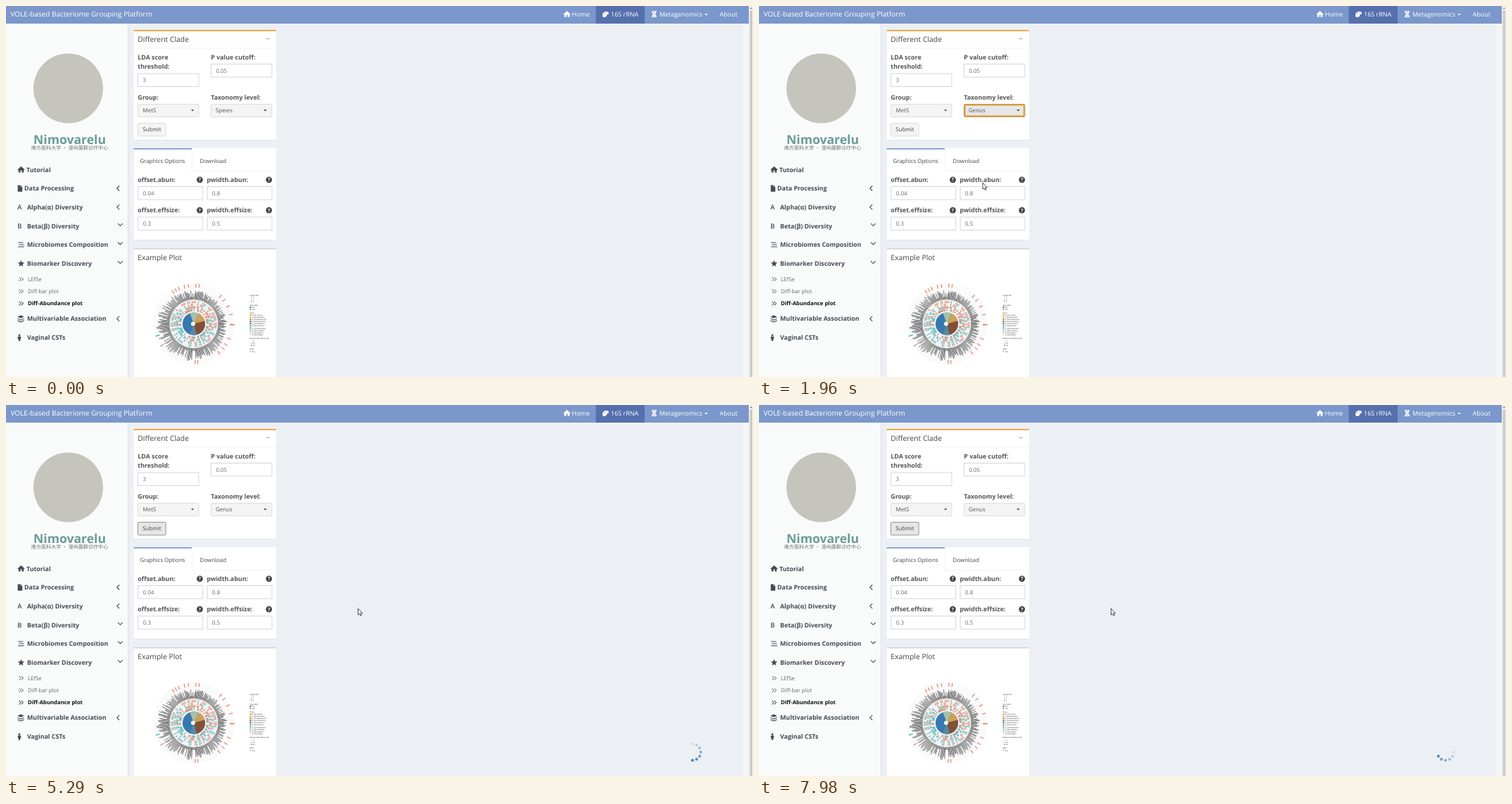
These frames come from a looping animation (1062 px wide and 527 px high, 8 s). An HTML page:

```html
<!DOCTYPE html>
<html lang="en">
<head>
<meta charset="utf-8">
<title>Bacteriome platform</title>
<style>
html, body { margin: 0; width: 100%; height: 100%; overflow: hidden; background: #ecf0f5; }
svg { display: block; width: 1062px; height: 527px; font-family: "Open Sans", "Noto Sans", sans-serif; text-rendering: geometricPrecision; }
</style>
</head>
<body>
<svg id="stage" viewBox="0 0 1062 527" xmlns="http://www.w3.org/2000/svg"></svg>
<script>
const LOOP = 8000;
const LEVELS = ['Kingdom', 'Phylum', 'Class', 'Order', 'Family', 'Genus', 'Speies'];
const ROW_TOP = 162.2, ROW_H = 16.8;

// Drawing helpers
const rect = (x, y, w, h, fill, extra = '') => `<rect x="${x}" y="${y}" width="${w}" height="${h}" fill="${fill}" ${extra}/>`;
const text = (x, y, s, size, fill, extra = '') => `<text x="${x}" y="${y}" font-size="${size}" fill="${fill}" ${extra}>${s}</text>`;
const bold = (x, y, s, fill = '#555', size = 8.87) => text(x, y, s, size, fill, 'font-weight="700"');
const circle = (x, y, r, fill, extra = '') => `<circle cx="${x}" cy="${y}" r="${r}" fill="${fill}" ${extra}/>`;
const path = (d, fill, extra = '') => `<path d="${d}" fill="${fill}" ${extra}/>`;
const stroke = (d, color, width) => path(d, 'none', `stroke="${color}" stroke-width="${width}"`);
const at = (x, y, body) => `<g transform="translate(${x} ${y})">${body}</g>`;
const caret = (x, y, fill) => path(`M${x - 2.2} ${y - 1.1}h4.4l-2.2 2.4z`, fill);
const home = (x, y, fill) => at(x, y, path('M0-4.6L5.2.2 4.5 1 3.7.3V4.3H1V1.2H-1V4.3H-3.7V.3L-4.5 1-5.2.2z', fill));

function random(seed) {
  return () => (seed = (seed * 16807) % 2147483647) / 2147483647;
}

function field(x, y, w, value) {
  return rect(x, y, w, 18.5, '#fff', 'stroke="#d2d6de"') + text(x + 7, y + 12.3, value, 7.9, '#666');
}

function navbar() {
  const blue = '#7b97cb', white = '#fff';
  return rect(0, 0, 1056, 25, blue) + rect(838.5, 0, 69.5, 25, '#5670ad')
    + text(6.5, 15.2, 'VOLE-based Bacteriome Grouping Platform', 10, white)
    + home(797.5, 11.5, white) + text(804.5, 14.6, 'Home', 9, white)
    + path('M848 13q0-4 4-5 4-1 5 2 0 2-2 2-1 0-1 2-1 2-4 2-2 0-2-3z', white)
    + circle(851, 11, .7, '#5670ad') + circle(854, 9.6, .7, '#5670ad')
    + text(860, 14.6, '16S rRNA', 9, white)
    + stroke('M918 7.5h7M918 15.5h7M919 8q0 2.5 2.5 3.5t2.5 3.5M924 8q0 2.5-2.5 3.5t-2.5 3.5M919.5 9.4h4M919.5 13.7h4', white, 1.2)
    + text(929, 14.6, 'Metagenomics', 8.95, white) + caret(995.5, 12.2, white)
    + text(1014.5, 14.6, 'About', 9, white);
}

function sidebar() {
  const ink = '#454b52';
  const left = y => stroke(`M161.2 ${y - 3.5}l-3.5 3.5 3.5 3.5`, ink, 1.1);
  const down = y => stroke(`M159 ${y - 1.6}l3.4 3.4 3.4-3.4`, ink, 1.1);
  const sub = (y, s, active) => stroke(`M18.5 ${y - 5.5}l2.8 2.8-2.8 2.8M21.8 ${y - 5.5}l2.8 2.8-2.8 2.8`, active ? '#111' : '#555', 1)
    + (active ? bold(31, y, s, '#111', 7.78) : text(31, y, s, 7.8, '#666'));
  const star = Array.from({ length: 10 }, (_, i) => {
    const r = i % 2 ? 2.2 : 5, a = i * Math.PI / 5;
    return `${(21.5 + r * Math.sin(a)).toFixed(2)},${(366 - r * Math.cos(a)).toFixed(2)}`;
  }).join(' ');
  return rect(173, 25, 1.3, 502, '#dfe4ea') + rect(0, 25, 173, 502, '#f9fbfb')
    + circle(88.5, 117, 49.5, '#c6c5bd')
    + text(90.5, 196, 'Nimovarelu', 17.6, '#6a9c98', 'font-weight="700" text-anchor="middle"')
    + text(90.5, 204.4, '南方医科大学 · 澄屿菌群诊疗中心', 7.1, '#6b6f70', 'text-anchor="middle" style="font-family:\'Noto Sans CJK SC\',\'Noto Sans CJK\',sans-serif"')
    + home(21.5, 232.3, ink) + bold(29, 235.6, 'Tutorial', ink)
    + path('M16.7 254.5h4v2.6h2.5v6.6h-6.5zM21.3 254.5l1.9 1.9h-1.9z', ink) + bold(26, 262.3, 'Data Processing', ink) + left(259)
    + text(16.3, 289, 'A', 9.4, ink, 'font-weight="600"') + bold(30, 289, 'Alpha(α) Diversity', ink) + left(285.6)
    + text(16.3, 315.7, 'B', 9.4, ink, 'font-weight="600"') + bold(30, 315.7, 'Beta(β) Diversity', ink) + down(310.5)
    + stroke('M17 336h7.5M18.5 339h7M17 342h9', ink, 1.2) + bold(30, 342.4, 'Microbiomes Composition', ink) + down(337.2)
    + `<polygon points="${star}" fill="${ink}"/>` + bold(30, 369, 'Biomarker Discovery', ink) + down(364)
    + sub(390.7, 'LEfSe') + sub(408, 'Diff-bar plot') + sub(425.3, 'Diff-Abundance plot', true)
    + path('M21 439.3l4.7 2.1-4.7 2.1-4.7-2.1zM16.3 443.4l4.7 2 4.7-2v1.2l-4.7 2.1-4.7-2.1zM16.3 446.2l4.7 2 4.7-2v1.2l-4.7 2.1-4.7-2.1z', ink)
    + bold(30, 447.4, 'Multivariable Association', ink) + left(444.2)
    + circle(19, 467.7, 1.4, ink) + path('M16.8 469.5h4.4v3.4h-.9v2.8h-2.6v-2.8h-.9z', ink) + bold(30, 474, 'Vaginal CSTs', ink);
}

function card(y, h, accent) {
  return rect(181.5, y + .6, 202.5, h, '#d9dde3') + rect(181.5, y, 202.5, h, '#fff')
    + (accent ? rect(181.5, y, 202.5, 1.7, accent) : '');
}

function forms() {
  const help = (x, y) => circle(x, y, 4.4, '#444') + text(x, y + 2.5, '?', 7, '#fff', 'font-weight="700" text-anchor="middle"');
  const option = (x, y, label, value) => bold(x, y, label) + help(x + 88.2, y - 3.2) + field(x + .5, y + 6.5, 92, value);
  return card(34, 156, '#eb9f30') + rect(181.5, 59.5, 202.5, 1, '#f4f4f4')
    + text(187.3, 51.2, 'Different Clade', 10.38, '#444') + rect(369.3, 46.2, 5.4, .9, '#97a0b3')
    + bold(187.3, 76, 'LDA score') + bold(187.3, 89.3, 'threshold:') + field(187.5, 96, 86.5, '3')
    + bold(291.3, 76, 'P value cutoff:') + field(291.5, 82.5, 86.5, '0.05')
    + bold(187.3, 132.8, 'Group:') + bold(291.3, 132.8, 'Taxonomy level:')
    + rect(187.5, 139.5, 86.5, 18, '#f4f4f4', 'stroke="#ddd" rx="1"') + text(194.6, 151.3, 'MetS', 7.95, '#555') + caret(265.2, 148.3, '#444')
    + card(202, 130) + rect(264, 234, 120, 1, '#f4f4f4') + rect(264, 202, 1, 32, '#f4f4f4') + rect(181.5, 202, 82.5, 1.7, '#7b97cb')
    + text(190.6, 222.5, 'Graphics Options', 7.95, '#444') + text(275.6, 222.5, 'Download', 7.95, '#444')
    + option(187.3, 250, 'offset.abun:', '0.04') + option(285.6, 250, 'pwidth.abun:', '0.8')
    + option(187.3, 293.3, 'offset.effsize:', '0.3') + option(285.6, 293.3, 'pwidth.effsize:', '0.5')
    + card(344, 190, '#d2d6de') + text(187.3, 360.7, 'Example Plot', 10.38, '#444');
}

// Circular abundance plot
function plot() {
  const rnd = random(73);
  const ray = (deg, r0, r1) => {
    const a = deg * Math.PI / 180, s = Math.sin(a), c = -Math.cos(a);
    return `M${(r0 * s).toFixed(1)} ${(r0 * c).toFixed(1)}L${(r1 * s).toFixed(1)} ${(r1 * c).toFixed(1)}`;
  };
  const wedge = (from, to, r, fill) => path(`${ray(from, 0, r)}A${r} ${r} 0 ${to - from > 180 ? 1 : 0} 1 ${ray(to, r, 0).slice(1).split('L')[0]}Z`, fill);
  let gray = '', teal = '', salmon = '';
  for (let deg = 0; deg < 360; deg += 1.8) {
    const envelope = 13.5 + 4 * Math.cos((deg - 225) * Math.PI / 180);
    const short = rnd() < .2;
    gray += ray(deg, 34.5, 37 + (short ? 1.5 : envelope * (.5 + .5 * rnd())));
  }
  // Marks share a colour along each ray, teal gathering at the lower left
  for (let deg = 0; deg < 360; deg += 4) {
    const tealShare = .5 - .35 * Math.cos((deg - 40) * Math.PI / 180);
    for (let r = 18; r < 33; r += 3.8) {
      if (rnd() > .58) continue;
      const mark = ray(deg, r, r + 3.4);
      if (rnd() < tealShare) teal += mark; else salmon += mark;
    }
  }
  const ticks = [327, 332, 337, 346, 352, 3, 8, 44, 52, 63, 76, 91, 113, 123, 130, 139, 174, 178, 236];
  const outer = ticks.map(d => ray(d, 51.5, 57)).join('');
  const labels = ['p_Firmicutes', 'p_Bacteroidota', 'p_Proteobacteria', 'p_Actinobacteria', 'p_Fusobacteria', 'p_Tenericutes', 'p_Cyanobacteria', 'p_Spirochaetes', 'p_Synergistes', 'p_Chloroflexi'];
  const colors = ['#d99b3d', '#d4b65d', '#b37d48', '#8b5b3c', '#3f78ad', '#68acc7', '#4db2b5', '#87c8ce', '#bbb', '#ddd'];
  const tiny = (y, s, x = 346.5) => text(x, y, s, 2.5, '#222');
  const legend = tiny(411.5, 'log10(LDA)') + [413.8, 416.7, 419.6].map((y, i) => circle(349, y, .6 + i * .15, '#999') + tiny(y + 1, i + 2, 351)).join('')
    + tiny(425.5, 'Sign_MetS') + rect(346.5, 427, 2, 2, '#666') + tiny(429, 'No', 350) + rect(346.5, 430, 2, 2, '#54aeb1') + tiny(432, 'Yes', 350)
    + tiny(436.8, 'Phyla') + labels.map((s, i) => rect(346.5, 438 + i * 3.05, 2.2, 2.2, colors[i]) + tiny(440.2 + i * 3.05, s, 350)).join('')
    + tiny(473, 'Relative Abundance (%)') + [476, 479, 482].map((y, i) => circle(349, y, .5 + i * .2, '#888') + tiny(y + 1, i * 20, 351)).join('')
    + tiny(488.2, 'MetS') + rect(346.5, 489.5, 2, 2, '#bbb') + tiny(491.7, 'Yes', 350);
  return at(267, 451.5,
    circle(0, 0, 58, '#fafafa') + circle(0, 0, 34.5, '#f1f4f4')
    + stroke(teal, '#58b9bc', 1.1) + stroke(salmon, '#de7f68', 1.1)
    + stroke(gray, '#6c6c6c', .95) + circle(0, 0, 35.3, 'none', 'stroke="#999" stroke-width=".8"')
    + stroke(outer, '#e0866d', 1.2) + stroke(ray(252, 51, 57), '#4fb2b4', 1.5)
    + circle(0, 0, 16, '#3878b0') + wedge(340, 385, 16, '#a8bfa6') + wedge(25, 75, 16, '#cfa056')
    + wedge(75, 165, 16, '#80503a') + wedge(165, 200, 16, '#5b88a0')
    + circle(-1, 0, 3, '#f4f4ee') + text(51, 2.4, 'MetS', 3.2, '#c9493c')) + legend;
}

const chrome = rect(1048, 25, 8, 502, '#f4f5f7') + rect(1056, 0, 6, 527, '#f1f1f1')
  + rect(1057.5, 6.5, 3.5, 520.5, '#c9c9c9') + path('M1057.5 4h3.5l-1.75-2z', '#777');

const arrowShape = path('M0 0V9.2L2.1 7.3 3.5 10.5 5 9.8 3.6 6.8H6.3z', '#fff', 'stroke="#222" stroke-width=".8"');
const handShape = path('M-1 1Q0-.5 1 1V5L4.6 5.8Q6 6.2 5.8 8L5 11V13.3H-.6L-3 9Q-3.6 7.1-2 7.2L-1 8.3z', '#fff', 'stroke="#222" stroke-width=".9" stroke-linejoin="round"')
  + stroke('M1.2 5v3M3 5.6v2.6M4.5 6v2.4', '#222', .5);

const stage = document.getElementById('stage');
stage.innerHTML = rect(0, 0, 1062, 527, '#ecf0f5') + chrome + sidebar() + navbar() + forms() + plot() + '<g id="live"></g>';
const live = document.getElementById('live');

// Pointer moves: start, end, from, to
const MOVES = [
  [130, 870, [888, 494], [336, 144]],
  [1210, 1500, [336, 144], [318, 251]],
  [2030, 2660, [318, 252], [213, 170]],
  [2930, 3490, [213, 170], [500.5, 289]]
];
const CLICKS = [[1140, 1210], [1890, 1960], [2700, 2780]];
const within = (t, [a, b]) => t >= a && t < b;

function pointer(t) {
  const [a, b, from, to] = MOVES.filter(m => m[0] <= t).pop() || MOVES[0];
  const p = Math.min(1, Math.max(0, (t - a) / (b - a)));
  const e = p * p * (3 - 2 * p);
  return from.map((v, i) => v + (to[i] - v) * e);
}

function levelSelect(t, hovered) {
  const focused = within(t, [1140, 2700]);
  const fill = focused ? (t < 1960 ? '#d4d4d4' : '#e7e7e7') : hovered ? '#e7e7e7' : '#f4f4f4';
  return rect(291.5, 139.5, 86.5, 18, fill, `stroke="${focused ? '#a9a08e' : '#ddd'}" rx="1"`)
    + (focused ? rect(292.7, 140.7, 84.1, 15.6, 'none', 'stroke="#e39b1c" stroke-width="1.8" rx="1.2"') : '')
    + text(298, 151.3, t < 1960 ? 'Speies' : 'Genus', 7.95, '#555') + caret(368.5, 148.3, '#333');
}

function dropdown(t) {
  const hover = Math.floor((pointer(t - 30)[1] - ROW_TOP) / ROW_H);
  return rect(291.5, 159, 467.5, 123, '#fff', 'stroke="#e6e8eb" stroke-width=".5"') + LEVELS.map((name, i) => {
    const y = ROW_TOP + i * ROW_H, chosen = i === 6;
    const back = chosen ? '#4179b7' : i === hover ? '#e1e1e7' : '';
    return (back ? rect(291.5, y + .4, 467.5, ROW_H - .2, back) : '') + text(303, y + 11.8, name, 9.15, chosen ? '#fff' : '#777');
  }).join('');
}

function submitButton(t, hovered) {
  const pressed = t >= 2700;
  return rect(187.5, 166.5, 39.7, 18.3, hovered || pressed ? '#e6e6e6' : '#f4f4f4', `stroke="${pressed ? '#959595' : hovered ? '#adadad' : '#ddd'}" rx="1.5"`)
    + text(194.2, 178.4, 'Submit', 7.98, '#444');
}

function spinner(t) {
  let dots = '';
  for (let j = 0; j < 12; j++) {
    const age = (((t - 1085) / 100 - j) % 12 + 12) % 12;
    const a = j * Math.PI / 6;
    if (age < 7.2) dots += circle(976 + 11.75 * Math.sin(a), 493 - 11.75 * Math.cos(a), 2.1, '#4682b4', `opacity="${1 - age / 7.2}"`);
  }
  return dots;
}

function render(t) {
  const [x, y] = pointer(t);
  const shown = t >= 130;
  const open = within(t, [1240, 1960]);
  const onSelect = shown && x > 291 && x < 378 && y > 139 && y < 158;
  const onSubmit = shown && x > 187 && x < 227 && y > 166 && y < 185;
  const clicking = CLICKS.some(c => within(t, c));
  live.innerHTML = levelSelect(t, onSelect) + submitButton(t, onSubmit)
    + (open ? dropdown(t) : '')
    + (t >= 3130 ? spinner(t) : '')
    + (clicking ? circle(x, y + 3, 6, '#f2dc1c', 'opacity=".8"') : '')
    + (shown ? at(x, y, open || onSelect || onSubmit ? handShape : arrowShape) : '');
}

const start = performance.now();
function tick() {
  render((performance.now() - start) % LOOP);
  requestAnimationFrame(tick);
}
tick();
</script>
</body>
</html>
```
